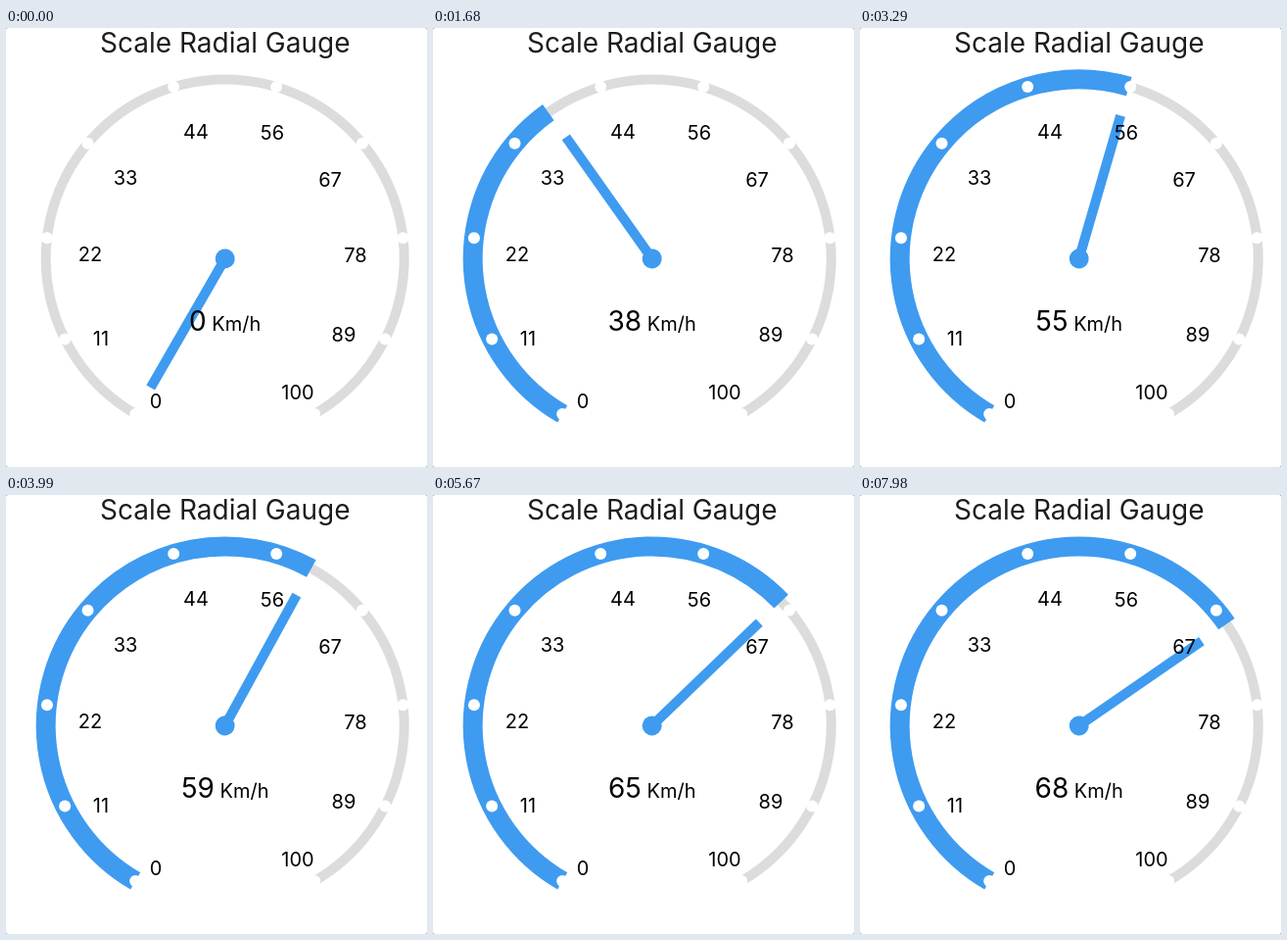
An HTML page that plays this animation: 430 px wide and 448 px high, repeating every 8 s.

```html
<!DOCTYPE html>
<html lang="en">
<head>
<meta charset="utf-8">
<title>Scale Radial Gauge</title>
<style>
  html, body { margin: 0; width: 100%; height: 100%; overflow: hidden; background: #8a8a8a; }
  svg { display: block; width: 430px; height: 448px; background: #fff; border-radius: 2px; }
  text { font: 20px Inter, "Liberation Sans", sans-serif; fill: #000; text-anchor: middle; }
  .title { font-size: 28px; fill: #1d1d1f; }
  .value { font-size: 28px; }
  .unit { font-size: 20px; }
  .arc { fill: none; }
</style>
</head>
<body>
<svg viewBox="0 0 430 448">
  <text class="title" x="223.7" y="25">Scale Radial Gauge</text>
  <path class="arc" id="track" stroke="#dcdcdc" stroke-width="10"/>
  <path class="arc" id="fill" pathLength="100" stroke="#3e9bf0" stroke-width="20"/>
  <g id="dots" fill="#fff"></g>
  <g id="needle" fill="#3e9bf0">
    <rect x="-5" y="-152" width="10" height="152"/>
    <circle r="10"/>
  </g>
  <g id="labels"></g>
  <text class="value" x="223.7" y="309" xml:space="preserve"><tspan id="number">0</tspan><tspan class="unit"> Km/h</tspan></text>
</svg>
<script>
  const LOOP = 8000, STEP = 70;
  const CX = 223.7, CY = 235.4, RADIUS = 183;
  const TARGET = 70, RATE = 0.000483, DELAY = 45;
  const LABELS = [
    [0, 153, 381], [11, 97, 317], [22, 86, 231], [33, 122, 153], [44, 194, 106],
    [56, 272, 107], [67, 331, 155], [78, 357, 232], [89, 345, 313], [100, 298, 372]
  ];
  const byId = id => document.getElementById(id);
  const angleOf = value => -150 + value * 3;

  function pointAt(value) {
    const a = angleOf(value) * Math.PI / 180;
    return [CX + RADIUS * Math.sin(a), CY - RADIUS * Math.cos(a)];
  }

  function add(parent, tag, attrs, text = "") {
    const el = document.createElementNS("http://www.w3.org/2000/svg", tag);
    for (const key in attrs) el.setAttribute(key, attrs[key]);
    el.textContent = text;
    byId(parent).append(el);
  }

  const arc = `M${pointAt(0)} A${RADIUS} ${RADIUS} 0 1 1 ${pointAt(100)}`;
  byId("track").setAttribute("d", arc);
  byId("fill").setAttribute("d", arc);

  LABELS.forEach(([label, x, y], i) => {
    const [cx, cy] = pointAt(i * 100 / 9);
    add("dots", "circle", { cx, cy, r: 6 });
    add("labels", "text", { x, y: y + 7 }, label);
  });

  function draw() {
    const time = Math.floor(performance.now() % LOOP / STEP) * STEP;
    const value = TARGET * (1 - Math.exp(-RATE * Math.max(0, time - DELAY)));
    byId("fill").setAttribute("stroke-dasharray", `${value} 200`);
    byId("needle").setAttribute("transform", `translate(${CX} ${CY}) rotate(${angleOf(value)})`);
    byId("number").textContent = Math.floor(value);
    requestAnimationFrame(draw);
  }
  draw();
</script>
</body>
</html>
```
